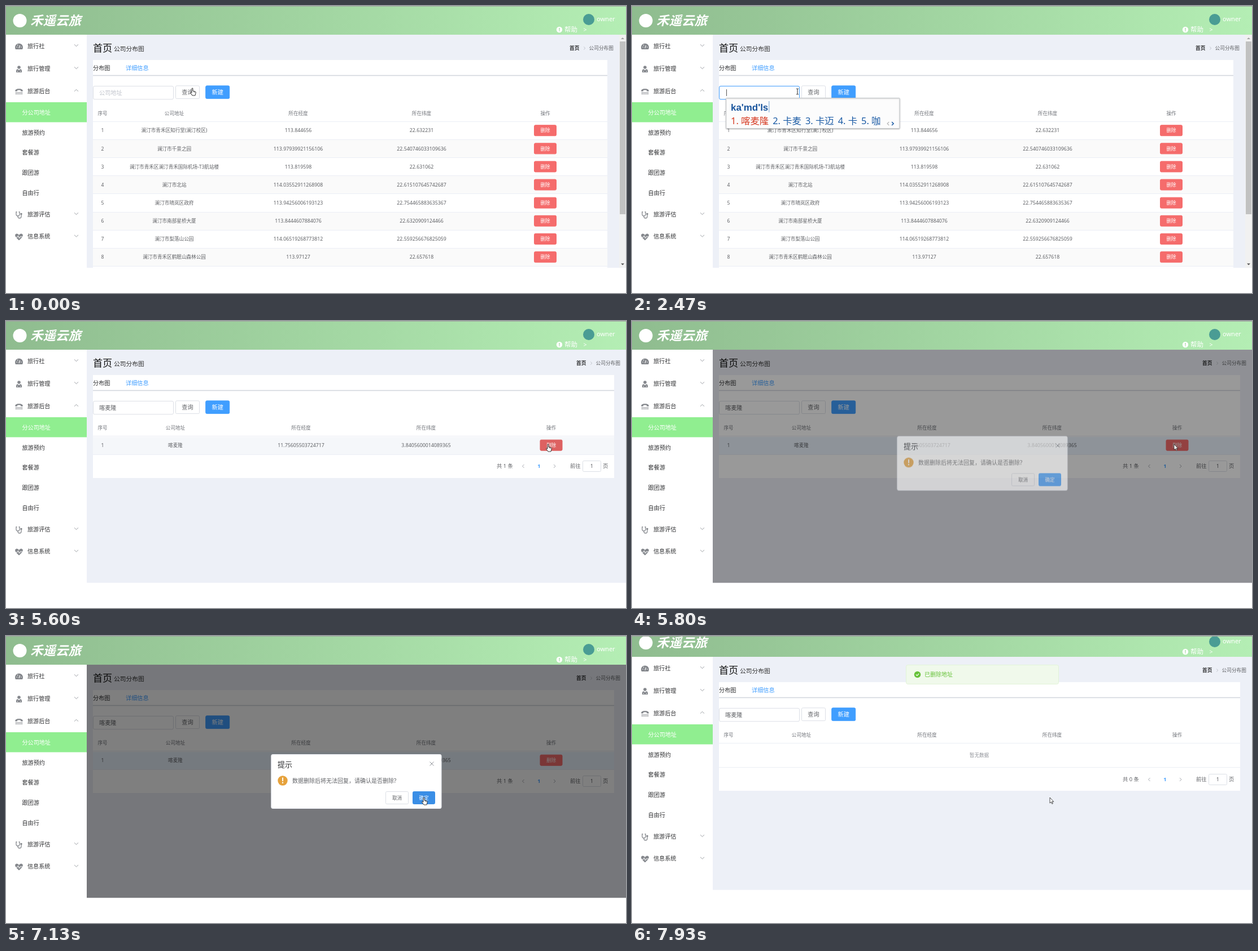
These frames come from a looping animation (1098 px wide and 510 px high, 8 s). An HTML page with a canvas:

```html
<!DOCTYPE html>
<html lang="zh-CN">
<head>
<meta charset="utf-8">
<title>公司分布图</title>
<style>
html, body { margin: 0; width: 100%; height: 100%; overflow: hidden; background: #fff; }
canvas { display: block; }
</style>
</head>
<body>
<canvas id="stage" width="1098" height="510"></canvas>
<script>
let ctx = document.getElementById('stage').getContext('2d');
const layer = ctx.canvas.cloneNode().getContext('2d');
const LOOP = 8000, FPS = 15, BOTTOM = 465.5;
const SANS = '"Noto Sans","Noto Sans CJK SC",sans-serif';
const BLUE = '#409eff', INK = '#303133', GREY = '#606266', DIM = '#909399', LINE = '#dcdfe6', FAINT = '#ebeef5';

const PLACES = [
  ['澜汀市青禾区知行堂(澜汀校区)', '113.844656', '22.632231'],
  ['澜汀市千景之园', '113.97939921156106', '22.540746033109636'],
  ['澜汀市青禾区澜汀青禾国际机场-T3航站楼', '113.819598', '22.631062'],
  ['澜汀市北站', '114.03552911268908', '22.615107645742687'],
  ['澜汀市晴岚区政府', '113.94256006193123', '22.754465883635367'],
  ['澜汀市南部星桥大厦', '113.8444607884076', '22.6320909124466'],
  ['澜汀市梨落山公园', '114.06519268773812', '22.559256676825059'],
  ['澜汀市青禾区鹤眠山森林公园', '113.97127', '22.657618'],
];
const FOUND = [['喀麦隆', '11.75605503724717', '3.8405600014089365']];

// Input method: start time, letters, candidates
const IME = [
  [1190, 'k', '看 可 快 开 卡'],
  [1325, "ka", '卡 咖 喀 咔 佧'],
  [1990, "ka'm", '卡姆 卡马 卡麦 卡迈 卡门'],
  [2125, "ka'md'l", '卡麦 卡迈 喀麦 咖麦 卡门'],
  [2460, "ka'md'ls", '喀麦隆 卡麦 卡迈 卡 咖'],
];

// Pointer path: time, x, y
const POINTER = [
  [133, 330, 146], [400, 293, 152], [3267, 293, 152], [3600, 308, 151],
  [4267, 308, 151], [4400, 520, 130], [4533, 791, 197], [4733, 791, 197],
  [5267, 960, 219], [5833, 960, 219], [6333, 699, 267], [6667, 740, 287],
];

const clamp = v => Math.max(0, Math.min(1, v));
const ease = v => 1 - (1 - clamp(v)) ** 2;

function text(str, x, cy, size = 10, color = INK, align = 'left', weight = 400, family = SANS) {
  ctx.font = `${weight} ${size}px ${family}`;
  ctx.fillStyle = color;
  ctx.textAlign = align;
  ctx.fillText(str, x, cy + size * .37);
  return ctx.measureText(str).width;
}
const mid = (str, x, cy, size, color, weight) => text(str, x, cy, size, color, 'center', weight);

function rect(x, y, w, h, color) {
  ctx.fillStyle = color;
  ctx.fillRect(x, y, w, h);
}
function box(x, y, w, h, r, fill, stroke) {
  ctx.beginPath();
  ctx.roundRect(x + .5, y + .5, w - 1, h - 1, r);
  ctx.fillStyle = fill;
  ctx.fill();
  ctx.lineWidth = 1;
  ctx.strokeStyle = stroke || fill;
  ctx.stroke();
}
function button(label, x, y, w, h, size, fill, color, border) {
  box(x, y, w, h, 2, fill, border);
  mid(label, x + w / 2, y + h / 2, size, color);
}
function circle(x, y, r, color) {
  ctx.beginPath();
  ctx.arc(x, y, r, 0, 7);
  ctx.fillStyle = color;
  ctx.fill();
}
function path(d, x, y, fill, stroke, width = 1) {
  const p = new Path2D(d);
  ctx.save();
  ctx.translate(x, y);
  if (fill) { ctx.fillStyle = fill; ctx.fill(p); }
  if (stroke) { ctx.strokeStyle = stroke; ctx.lineWidth = width; ctx.stroke(p); }
  ctx.restore();
}
// Draws a group with one shared opacity
function fade(alpha, dy, drawGroup) {
  if (!alpha) return;
  const base = ctx;
  ctx = layer;
  ctx.clearRect(0, 0, 1098, 510);
  drawGroup();
  ctx = base;
  ctx.save();
  ctx.globalAlpha = alpha;
  ctx.drawImage(layer.canvas, 0, dy);
  ctx.restore();
}
const chevron = {
  down: 'M-3.5-1.7L0 1.7 3.5-1.7', up: 'M-3.5 1.7L0-1.7 3.5 1.7',
  left: 'M1.5-3L-1.5 0 1.5 3', right: 'M-1.5-3L1.5 0-1.5 3',
};

const ICON = '#85888d';
const icons = {
  gauge(x, y) {
    path('M-6 5a7 7 0 1 1 12 0z', x, y, ICON);
    path('M0 3L1.5-2M-4.5 1h1.5M3 1h1.5M-3-3l1 1', x, y, null, '#fff', 1.1);
  },
  person(x, y) {
    circle(x, y - 3, 2.8, ICON);
    path('M-5 6v-3q0-2.5 3-2.8l2 2 2-2q3 .3 3 2.8v3z', x, y, ICON);
    path('M-2.5 3v2M2.5 3v2', x, y, null, '#fff', .8);
  },
  phone(x, y) {
    path('M-7-.5q0-4.5 7-4.5t7 4.5h-4v-1.7q-3-1-6 0v1.7z', x, y, ICON);
    for (let i = 0; i < 10; i++) rect(x - 6 + i % 5 * 2.6, y + 1 + (i > 4) * 2.5, 1.6, 1.5, ICON);
  },
  stethoscope(x, y) {
    path('M-3.5-5h-1.5v4q0 3 3 3t3-3v-4h-1.5M-2 2v1q0 3 3 3t3-3v-3', x, y, null, ICON, 1.3);
    circle(x + 4, y - 1.5, 1.7, ICON);
  },
  heart(x, y) {
    path('M0 6L-6 0q-2.5-5 2-6 2.5 0 4 2.5 1.5-2.5 4-2.5 4.5 1 2 6z', x, y, ICON);
    path('M-7 .5h4l1.5-3 2 5 1.5-3h5', x, y, null, '#fff');
  },
};
const MENU = [
  ['旅行社', 71, 'gauge'], ['旅行管理', 111, 'person'], ['旅游后台', 151, 'phone'],
  ['旅游评估', 370, 'stethoscope'], ['信息系统', 409.5, 'heart'],
];
const SUBMENU = ['分公司地址', '旅游预约', '套餐游', '跟团游', '自由行'];

function drawHeader() {
  const g = ctx.createLinearGradient(0, 0, 1098, 0);
  g.addColorStop(0, '#8fbc8f');
  g.addColorStop(1, '#b4eeb4');
  rect(0, 0, 1098, 51, g);
  circle(24.5, 26, 12, '#fff');
  text('禾遥云旅', 43, 26, 22.5, '#fff', 'left', 'italic 900');
  circle(1032, 24, 10, '#4a9c94');
  text('owner', 1046, 23, 11, '#fff');
  circle(980, 42, 5.2, '#fff');
  mid('!', 980, 42, 9, '#a5dba5', 800);
  text('帮助', 989, 42, 11.5, '#fff');
  mid('>', 1025.5, 42, 10.5, '#fff');
}

function drawSidebar() {
  rect(0, 51, 143, BOTTOM - 51, '#fff');
  for (const [label, y, icon] of MENU) {
    icons[icon](23, y + 1);
    text(label, 38, y, 10.1);
    path(icon === 'phone' ? chevron.up : chevron.down, 124.5, y - 1, null, DIM, .9);
  }
  rect(0, 171, 143, 35.5, '#90ee90');
  SUBMENU.forEach((label, i) => text(label, 28.5, 189 + i * 35.8, 10.1, i ? INK : '#fff'));
}

function drawTable(s) {
  const cols = s.full ? [171, 298, 517.5, 736, 955] : [171, 300, 522.5, 744, 965.5];
  const top = s.full ? 205 : 204.5, right = s.right;
  ['序号', '公司地址', '所在经度', '所在纬度', '操作'].forEach((h, i) =>
    mid(h, cols[i], top - 14.3, 8.6, '#72757b'));
  rect(154, Math.floor(top), right - 154, 1, FAINT);
  s.rows.forEach((row, i) => {
    const y = top + i * 32.13, cy = y + 16.2;
    rect(154, Math.round(y) + 1, right - 154, 31, s.rowColor || (i % 2 ? '#fafafa' : '#fff'));
    rect(154, Math.round(y + 32), right - 154, 1, FAINT);
    mid(i + 1, cols[0], cy, 8.6, GREY);
    row.forEach((cell, c) => mid(cell, cols[c + 1], cy, c ? 8.75 : 8.6, GREY));
    button('删除', cols[4] - 20, cy - 10, 40, 20, 8.6, s.deleteColor, '#fff');
  });
  if (s.full) return;
  const count = s.rows.length, cy = count ? 258 : 269;
  if (!count) {
    mid('暂无数据', 615, 226, 8.6, DIM);
    rect(154, 247, right - 154, 1, FAINT);
  }
  text(`共 ${count} 条`, 869, cy, 9.3, GREY);
  path(chevron.left, 916, cy, null, '#a8abb2');
  mid('1', 944, cy, 9.3, BLUE, 700);
  path(chevron.right, 971.5, cy, null, '#a8abb2');
  text('前往', 999, cy, 9.3, GREY);
  box(1021, cy - 10, 33, 20, 2, '#fff', LINE);
  mid('1', 1037.5, cy, 9.3, GREY);
  text('页', 1057, cy, 9.3, GREY);
}

function drawScrollbar() {
  rect(1086, 51, 12, BOTTOM - 51, '#f1f1f1');
  rect(1087, 63, 10, 307, '#c1c1c1');
  path('M-3 1.5L0-1.5 3 1.5z', 1092, 57.5, '#a3a3a3');
  path('M-3-1.5L0 1.5 3-1.5z', 1092, 459, '#505050');
}

function drawPage(t, s) {
  rect(143, 51, 955, BOTTOM - 51, '#edf0f7');
  text('首页', 154, 75, 17.1, '#111');
  text('公司分布图', 191, 76, 10.75, '#333');
  const dx = s.full ? 0 : 12;
  text('首页', 998 + dx, 75, 8.7, INK, 'left', 700);
  path('M-1.2-2.6L1.2 0-1.2 2.6', 1024.5 + dx, 75, null, '#c0c4cc');
  text('公司分布图', 1032.5 + dx, 75, 8.7, GREY);

  const bottom = s.full ? BOTTOM : s.rows.length ? 279 : 289;
  rect(154, 96, s.right - 154, bottom - 96, '#fff');
  text('分布图', 154, 110, 10.2);
  text('详细信息', 212, 110, 10.2, BLUE);
  rect(154, 122.7, s.right - 154, 1.6, '#d3d7de');

  box(154, 141.9, 143, 24.4, 2.5, '#fff', LINE);
  ctx.globalAlpha = clamp((t - 680) / 150) * (1 - clamp((t - 3750) / 150));
  box(154, 141.9, 143, 24.4, 2.5, '#fff', BLUE);
  ctx.globalAlpha = 1;
  if (t < 1190) text('公司地址', 165, 154, 10.2, '#c0c4cc');
  if (t > 2790) text('喀麦隆', 165, 154, 10.2, GREY);
  const typing = t > 725 && t < 2790 && !(t > 1790 && t < 2260);
  if (typing || (t > 2790 && t < 3325)) rect(typing ? 167 : 196, 148, 1, 12, '#555');

  const pressed = t > 3790 && t < 5525;
  const search = (...colors) => button('查询', 300, 141.3, 43, 23.8, 10.2, ...colors);
  if (s.overSearch || pressed) search('#ecf5ff', BLUE, pressed ? '#66b1ff' : '#c6e2ff');
  else search('#fff', GREY, LINE);
  button('新建', 353.2, 141.3, 43, 23.8, 10.2, BLUE, '#fff');
  drawTable(s);
  if (s.full) drawScrollbar();
}

function drawDialog(t, s) {
  const show = d => ease((t - 5690) / d) * (1 - ease((t - 7190) / d));
  rect(143, 51, 955, BOTTOM - 51, `rgba(0,0,0,${show(200) / 2})`);
  const alpha = show(300);
  fade(alpha, -14 * (1 - alpha), () => {
    box(469.3, 210, 302.2, 97, 2.5, '#fff', FAINT);
    text('提示', 481, 228, 13);
    path('M-3.5-3.5l7 7m0-7l-7 7', 754, 227, null, DIM);
    circle(490, 257, 8.7, '#e6a23c');
    rect(489.1, 251.5, 1.9, 6.5, '#fff');
    circle(490, 260.8, 1.2, '#fff');
    text('数据删除后将无法回复，请确认是否删除?', 507, 257, 10, GREY);
    button('取消', 672, 276, 41, 23, 8.6, '#fff', GREY, LINE);
    button('确定', 720, 276, 40, 23, 8.6, t > 6925 ? '#3a8ee6' : s.overConfirm ? '#66b1ff' : BLUE, '#fff');
  });
}

function drawMessage(t) {
  const slide = -35 * (1 - ease((t - 7270) / 400));
  fade(ease((t - 7270) / 300), slide, () => {
    box(485, 65, 271, 35, 3, '#f0f9eb', '#e1f3d8');
    circle(505.5, 82.5, 5.8, '#67c23a');
    path('M-2.6 0l2 2L2.7-1.6', 505.5, 82.5, null, '#fff', 1.2);
    text('已删除地址', 518, 82.5, 10, '#67c23a');
  });
}

function drawIme(t) {
  const stage = IME.filter(s => t >= s[0]).pop();
  if (!stage || t > 2790) return;
  const [, letters, list] = stage;
  const words = list.split(' '), size = 16.4, indent = 18, gap = 7;
  const chars = words.join('').length;
  const right = 175 + chars * size + words.length * (indent + gap) + 27;
  ctx.save();
  ctx.shadowColor = 'rgba(0,0,0,.25)';
  ctx.shadowBlur = 2;
  ctx.shadowOffsetY = 1;
  box(166, 163, right - 166, 55, 1, '#fcfcfc', '#c8cbce');
  ctx.restore();
  const end = 175 + text(letters, 175, 179.5, 16.9, '#17539c', 'left', 700, '"Liberation Sans",sans-serif');
  rect(end + 1, 169, 1, 20, '#6f9fd0');
  let x = 175;
  words.forEach((word, i) => {
    const color = i ? '#1b5ba5' : '#d63a22';
    text(`${i + 1}.`, x, 204, size, color);
    x += indent;
    x += text(word, x, 204, size, color) + gap;
  });
  path(chevron.left, right - 21, 209, null, '#b5b5b5', 1.2);
  path(chevron.right, right - 13, 209, null, '#1b5ba5', 1.6);
}

function pointerAt(t) {
  const i = POINTER.findIndex(p => p[0] > t);
  if (i === 0) return POINTER[0].slice(1);
  if (i < 0) return POINTER[POINTER.length - 1].slice(1);
  const [t0, x0, y0] = POINTER[i - 1], [t1, x1, y1] = POINTER[i];
  const k = (t - t0) / (t1 - t0);
  return [x0 + (x1 - x0) * k, y0 + (y1 - y0) * k];
}

function drawPointer(x, y, kind) {
  if (kind === 'beam') {
    path('M-2-5h1.5l.5.5.5-.5h1.5M0-4.5v9M-2 5h1.5l.5-.5.5.5h1.5', x, y, null, '#222');
  } else if (kind === 'hand') {
    path('M-1 1c0-1.5 2-1.5 2 0v4l4 1c1 .3 1.4 1 1.2 2l-1.2 5h-5l-3.2-4.5c-.6-1.2.6-1.8 1.4-1l.8.8z', x, y, '#fff', '#222', .9);
    path('M2.6 5.5v2M4.3 6v2', x, y, null, '#222', .6);
  } else {
    path('M0 0v10l2.3-2 1.6 3.4 1.5-.7-1.6-3.3h3z', x, y, '#fff', '#222', .8);
  }
}

function draw(t) {
  const [x, y] = pointerAt(t);
  const over = (bx, by, w, h) => x >= bx && x <= bx + w && y >= by && y <= by + h;
  const modal = t > 5690 && t < 7190, full = t < 3925;
  const onSearch = over(300, 141, 43, 24);
  const overDelete = !full && t < 5690 && over(946, 210, 40, 21);
  const overConfirm = modal && over(720, 276, 40, 23);
  const overRow = !full && over(154, 205, 923, 32);
  const s = {
    full, overConfirm,
    right: full ? 1065 : 1077,
    rows: full ? PLACES : t < 7325 ? FOUND : [],
    overSearch: onSearch && t > 190,
    rowColor: t > 5690 ? '#ecf5ff' : overRow ? '#f5f7fa' : null,
    deleteColor: !overDelete ? '#f56c6c' : t > 5525 ? '#dd6161' : '#f78989',
  };
  const kind = onSearch || overDelete || overConfirm ? 'hand' : over(154, 142, 143, 24) ? 'beam' : 'arrow';
  const scroll = t > 7925 ? 14 : t > 7860 ? 6 : 0;

  rect(0, 0, 1098, 510, '#fff');
  ctx.save();
  ctx.translate(0, -scroll);
  drawHeader();
  drawSidebar();
  ctx.beginPath();
  ctx.rect(143, 51, 955, BOTTOM - 51);
  ctx.clip();
  drawPage(t, s);
  drawDialog(t, s);
  drawMessage(t);
  ctx.restore();
  drawIme(t);
  rect(0, 0, 1098, 1, '#9fa99f');
  drawPointer(x, y, kind);
}

const start = performance.now();
function tick() {
  const t = (performance.now() - start) % LOOP;
  draw(Math.floor((t + 5) * FPS / 1000) * 1000 / FPS);
  requestAnimationFrame(tick);
}
tick();
</script>
</body>
</html>
```
